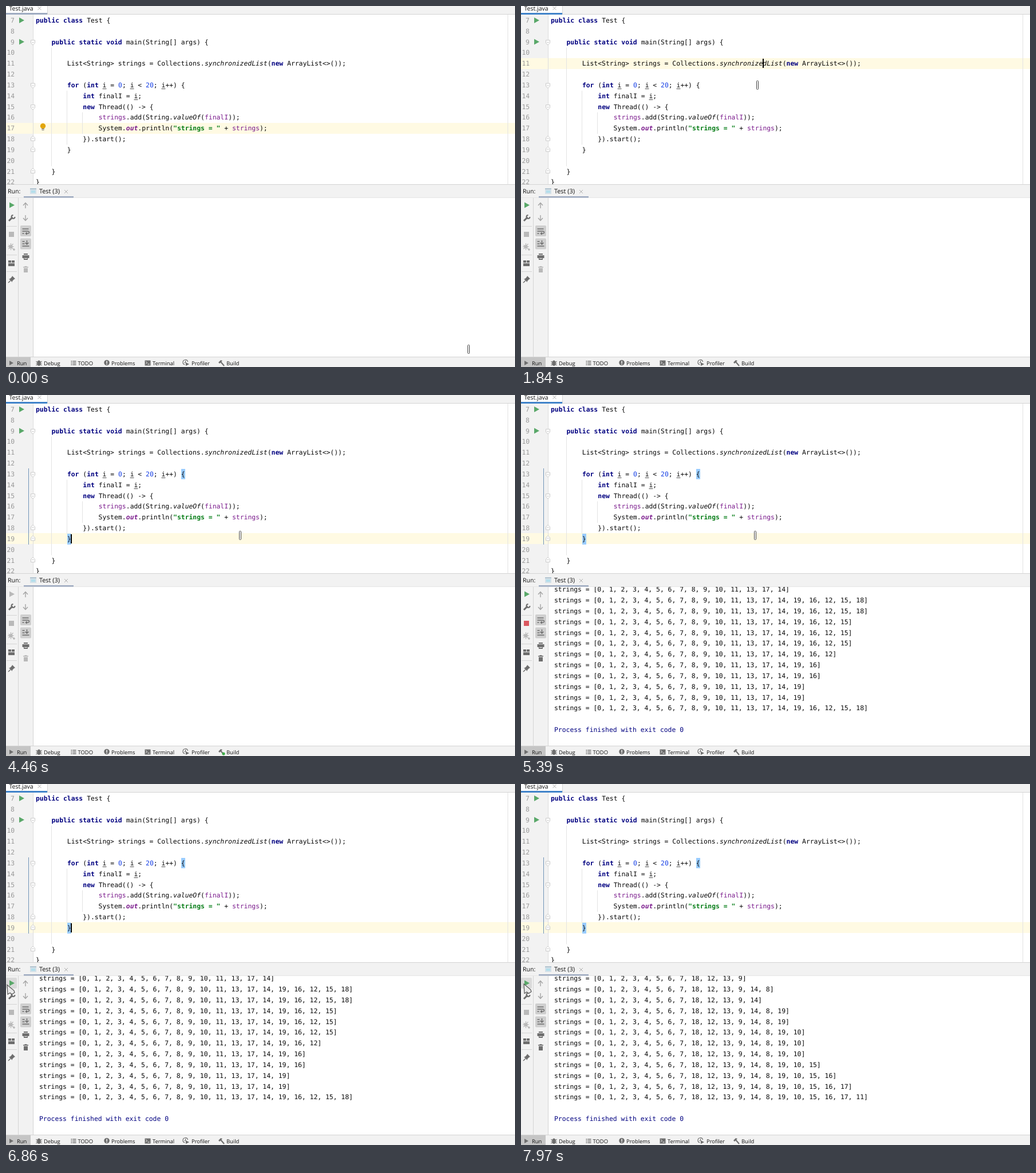
An HTML page with a canvas that plays this animation: 889x630 px, repeating every 8 s.

```html
<!DOCTYPE html>
<html lang="en">
<head>
<meta charset="utf-8">
<title>Editor run</title>
<style>
html, body { margin: 0; width: 100%; height: 100%; overflow: hidden; background: #fff; }
canvas { display: block; width: 889px; height: 630px; }
</style>
</head>
<body>
<canvas id="stage" width="889" height="630"></canvas>
<script>
const ctx = document.getElementById('stage').getContext('2d');
ctx.textRendering = 'geometricPrecision';
const LOOP = 8000, W = 889, H = 630;
const CW = 6.86, ROW = 18.83, LEFT = 52, OUT = 58;
const MONO = '11.395px "DejaVu Sans Mono", monospace';
const UI = 'px "Open Sans", "Noto Sans", sans-serif';
const BAR = '#f2f2f2', LINE = '#d4d4d4', DARK = '#6e6e6e', PALE = '#b9b9b9';
const GREEN = '#59a869', BLUE = '#4083c9', IDLE = '#9eabc1', NAVY = '#000080';

// Each piece after "|" starts with its style letter.
const STYLES = {
  '-': ['', '#080808'], k: ['bold ', NAVY], i: ['italic ', '#080808'],
  f: ['', '#7a1a8c'], o: ['italic bold ', '#7a1a8c'], s: ['bold ', '#067d17'],
  n: ['', '#1740e6'], u: ['', '#080808']
};
const CODE = [
  '|kpublic class|- Test {',
  '',
  '|-    |kpublic static void|- main(String[] args) {',
  '',
  '|-        List<String> strings = Collections.|isynchronizedList|-(|knew|- ArrayList<>());',
  '',
  '|-        |kfor|- (|kint|- |ui|- = |n0|-; |ui|- < |n20|-; |ui|-++) {',
  '|-            |kint|- finalI = |ui|-;',
  '|-            |knew|- Thread(() -> {',
  '|-                |fstrings|-.add(String.|ivalueOf|-(|ffinalI|-));',
  '|-                System.|oout|-.println(|s"strings = "|- + |fstrings|-);',
  '|-            }).start();',
  '|-        }',
  '',
  '|-    }',
  '|-}'
].map(s => s.split('|').slice(1));

const digits = n => Array.from({ length: n }, (_, i) => i);
const RUNS = [
  { order: [...digits(12), 13, 17, 14, 19, 16, 12, 15, 18],
    sizes: [15, 20, 20, 19, 19, 19, 18, 17, 17, 16, 16, 20] },
  { order: [...digits(8), 18, 12, 13, 9, 14, 8, 19, 10, 15, 16, 17, 11],
    sizes: [12, 14, 13, 15, 15, 16, 16, 16, 17, 18, 19, 20] }
];
const COMMAND = '"C:\\Program Files\\Tools\\jre-8.0.2021\\bin\\run.exe" ...';

// time, x, y
const PATH = [
  [0, 808, 599], [70, 808, 599], [300, 690, 470], [560, 430, 230], [820, 290, 95],
  [1240, 271, 98], [1450, 380, 97], [1640, 420, 95], [1710, 420, 95], [2000, 405, 190],
  [2180, 409, 245], [5390, 409, 245], [5660, 328, 298], [5740, 328, 298], [5950, 140, 380],
  [6160, 60, 415], [6400, 10, 429], [6720, 4, 353], [6860, 2, 350.5], [7680, 2, 350.5],
  [7830, 5, 349], [8000, 5, 349]
];
const CARET_OFF = [[2920, 3450], [3930, 4460], [4990, 5520], [6050, 6580], [7610, 8000]];

const within = (t, a, b) => t >= a && t < b;
const rowY = n => 25 + (n - 7) * ROW;

function pointer(t) {
  const i = Math.max(1, PATH.findIndex(p => p[0] > t));
  const [a, b] = [PATH[i - 1], PATH[i]];
  const k = (t - a[0]) / (b[0] - a[0]);
  return [a[1] + (b[1] - a[1]) * k, a[2] + (b[2] - a[2]) * k];
}

function box(x, y, w, h, color) {
  ctx.fillStyle = color;
  ctx.fillRect(x, y, w, h);
}

function pill(x, y, w, h, color) {
  ctx.fillStyle = color;
  ctx.beginPath();
  ctx.roundRect(x, y, w, h, 2);
  ctx.fill();
}

function text(s, x, y, color, font) {
  ctx.font = font;
  ctx.fillStyle = color;
  ctx.fillText(s, x, y);
}

// SVG path around a centre point, stroked when a width is given.
function icon(d, x, y, color, width) {
  const p = new Path2D(d);
  ctx.save();
  ctx.translate(x, y);
  ctx.fillStyle = ctx.strokeStyle = color;
  if (width) {
    ctx.lineWidth = width;
    ctx.stroke(p);
  } else {
    ctx.fill(p);
  }
  ctx.restore();
}

function dot(x, y, r, color) {
  ctx.fillStyle = color;
  ctx.beginPath();
  ctx.arc(x, y, r, 0, 7);
  ctx.fill();
}

const play = (x, y, color) => icon('M-4-5L5 0L-4 5Z', x, y, color);
const cross = (x, y) => icon('M-3-3L3 3M3-3L-3 3', x, y, '#b0b0b0', 1);

function codeLine(parts, y) {
  let col = 0;
  for (const part of parts) {
    const [style, color] = STYLES[part[0]];
    const s = part.slice(1), x = LEFT + col * CW;
    text(s, x, y, color, style + MONO);
    if (part[0] === 'u') box(x, y + 2, CW, 1, '#444');
    col += s.length;
  }
}

function editor(t) {
  const row = t < 1570 ? 17 : t < 2250 ? 11 : 19;
  const focused = t >= 1570;
  const blinkOff = CARET_OFF.some(([a, b]) => within(t, a, b));

  ctx.save();
  ctx.beginPath();
  ctx.rect(0, 0, W, 311);
  ctx.clip();
  box(0, 14, 47, 297, BAR);
  box(0, Math.round(rowY(row) - 9.5), W, 19, '#fffae3');
  box(47, 15, 1, 296, '#dcdcdc');
  box(876, 15, 1, 296, '#e2e2e2');
  for (const [x, a, b] of [[79, 10, 20], [106, 14, 18], [133, 16, 17]])
    box(x, rowY(a) - 9, 1, (b - a + 1) * ROW, '#e3e3e3');

  if (row === 19) {
    box(39, 128, 1, 133, '#6f93b8');
    box(306, 129, 7, 18, '#99ccff');
    box(107, 242, 7, 19, '#99ccff');
  }

  CODE.forEach((parts, i) => {
    const n = i + 7, y = Math.round(rowY(n) + 4);
    text(String(n), n < 10 ? 8 : 1.5, y, '#999', MONO);
    codeLine(parts, y);
  });
  play(27, 25, GREEN);
  play(27, 62.5, GREEN);

  for (const n of [9, 13, 15, 18, 19, 21]) {
    const d = n < 16 ? 'M-3.5-4H3.5V1L0 4.5L-3.5 1Z' : 'M-3.5 4H3.5V-1L0-4.5L-3.5-1Z';
    icon(d, 47, rowY(n) + (n < 16 ? 1 : -1), '#fff');
    icon(d + 'M-2 0H2', 47, rowY(n) + (n < 16 ? 1 : -1), '#c9c9c9', 1);
  }
  if (row === 17) {
    dot(64.5, 209.5, 4.7, '#e2a60c');
    box(62, 214, 5, 1, '#777');
    box(62.5, 216, 4, 1, '#777');
  }
  if (focused && !blinkOff) box(row === 11 ? 422 : 113, Math.round(rowY(row) - 8), 2, 16, '#000');
  ctx.restore();

  box(0, 0, W, 14, BAR);
  box(0, 0, 72, 14, '#fff');
  box(0, 14, W, 1, LINE);
  box(72, 0, 1, 14, LINE);
  box(0, 12, 72, 3, focused ? BLUE : IDLE);
  text('Test.java', 5.5, 8, '#111', 10.5 + UI);
  cross(58.5, 4);
}

function runHeader(t) {
  const active = within(t, 220, 1570);
  box(0, 311, W, 24, active ? '#e1e6eb' : BAR);
  box(0, 311, W, 1, LINE);
  if (active) for (const x of [255, 512, 769]) box(x, 312, 1, 22, '#eef1f4');
  box(0, 334, W, 1, active ? '#dce1e6' : '#e6e6e6');
  text('Run:', 3, 327, '#111', 10.5 + UI);
  box(42, 318, 11, 10, '#d3e0e8');
  box(42, 318, 11, 2, '#b3c4cf');
  box(44, 322, 7, 4, '#b4dfec');
  text('Test (3)', 58, 327, '#111', 10.9 + UI);
  cross(105, 324);
  box(31, 332, 87, 2.5, active ? BLUE : IDLE);
}

function toolbars(t, filled, running) {
  box(0, 335, 47, 277, BAR);
  box(21, 335, 1, 277, LINE);
  box(47, 335, 1, 277, LINE);
  for (const y of [384, 434, 463]) box(1, y, 18, 1, LINE);

  const busy = within(t, 3450, 5190) || within(t, 6930, 7340);
  if (t >= 6690) pill(0, 338, 19, 19, '#dadada');
  play(10, 347.5, busy ? PALE : GREEN);
  icon('M-5 5L1.5-1.5', 10, 370, DARK, 3);
  icon('M2-5A3 3 0 1 0 5-2', 10.5, 370, DARK, 2);
  box(5, 394, 9, 9, running ? '#db5860' : PALE);
  icon('M-5-3L4 5M-5 4L3-5M-6 0H4M-1-6V6', 9.5, 420, PALE, 1.3);
  dot(8.5, 420, 3, PALE);
  icon('M2 5H6M4 3V7', 10, 420, PALE, 1.5);
  box(4, 444, 5, 4, DARK);
  box(10, 444, 5, 4, DARK);
  box(4, 449, 11, 5, DARK);
  icon('M1-6L6-1L4 0L1 3L1 5L-5-1L-3-1L0-4Z', 10, 477, DARK);
  icon('M-2 2L-6 6', 10, 477, DARK, 1.4);

  icon('M0 5V-4M-4 0L0-4.5L4 0', 34, 348, '#a5a5a5', 1.4);
  icon('M0-5V4M-4 0L0 4.5L4 0', 34, 370, '#a5a5a5', 1.4);
  pill(25, 383, 19, 19, '#cfcfcf');
  pill(25, 405.5, 19, 19, '#cfcfcf');
  icon('M-6-4H5M-6 0H3Q6 0 6 2Q6 4 3 4H0M-6 4H-3M2 2L0 4L2 6', 34.5, 393, DARK, 1.4);
  icon('M-6 5H6M-6 1H-2M-6-3H-2M2-5V1M-1-1L2 2L5-1', 34.5, 414, DARK, 1.4);
  box(31, 432, 7, 2, DARK);
  box(28.5, 435, 12, 5, DARK);
  box(31, 439, 7, 4, DARK);
  box(32, 440, 5, 1, BAR);
  const bin = filled ? DARK : PALE;
  box(30, 455, 9, 1.5, bin);
  box(32.5, 454, 4, 1, bin);
  box(31, 457.5, 7, 7.5, bin);
}

function consoleRows(t, run) {
  box(48, 335, W - 48, 277, '#fff');
  if (within(t, 5190, 5390) || within(t, 7340, 7540)) text(COMMAND, OUT, 349, NAVY, MONO);
  if (!run) return;
  ctx.save();
  ctx.beginPath();
  ctx.rect(48, 335, W - 48, 277);
  ctx.clip();
  const y = i => Math.round(343.3 + i * ROW);
  run.sizes.forEach((n, i) =>
    text(`strings = [${run.order.slice(0, n).join(', ')}]`, OUT, y(i), '#080808', MONO));
  text('Process finished with exit code 0', OUT, y(13), NAVY, MONO);
  ctx.restore();
}

function bottomBar(t) {
  box(0, 612, W, 18, BAR);
  box(0, 612, W, 1, LINE);
  box(0, 613, 43, 17, '#c5c5c5');
  const labels = [['Run', 19], ['Debug', 66], ['TODO', 125.5], ['Problems', 184],
    ['Terminal', 256], ['Profiler', 324], ['Build', 385]];
  for (const [s, x] of labels) text(s, x, 627, '#111', 9.4 + UI);

  icon('M-3-4L4 0L-3 4Z', 9, 623, DARK);
  icon('M-5-3L5 4M-5 4L5-3M-5 .5H5', 57.5, 623, DARK, 1.2);
  icon('M-3 0A3 4.5 0 0 1 3 0V2A3 3 0 0 1-3 2Z', 57.5, 623, DARK);
  icon('M-4-3H-2M-4 0H-2M-4 3H-2M-1-3H5M-1 0H5M-1 3H5', 117.5, 623, DARK, 1.4);
  dot(176, 622.5, 4.8, DARK);
  box(175.3, 619.5, 1.5, 4, '#fff');
  box(175.3, 624.5, 1.5, 1.5, '#fff');
  box(242.5, 618.5, 10, 9, DARK);
  icon('M-3-2L-1 0L-3 2M0 2.5H3', 247.5, 622.5, '#fff', 1);
  icon('M4-1A4.3 4.3 0 1 0-1 4M0-3V0L-2 1', 313.5, 622, DARK, 1.2);
  icon('M0 0L6 3L0 6Z', 314, 622, DARK);
  icon('M-5-1L-1-5L2-4L-3 1Z', 376, 623, DARK);
  icon('M-1-2L5 5', 376, 623, DARK, 2);
  if (within(t, 3450, 5090) || within(t, 6930, 7200)) dot(380, 626, 2.6, '#3fae4a');
}

function cursor(t) {
  const [x, y] = pointer(t);
  if (x < 47 || within(y, 312, 335)) {
    const d = 'M0 0L1 16.5L5 14L8.5 16.5L13 13.5L12 10Z';
    icon(d, x, y, '#e8e8e8');
    icon(d, x, y, '#555', 1.2);
    return;
  }
  ctx.beginPath();
  ctx.roundRect(Math.round(x) - 1.5, Math.round(y) - 7.5, 3, 15, 1);
  ctx.fillStyle = '#f4f4f4';
  ctx.fill();
  ctx.strokeStyle = '#4a4a4a';
  ctx.lineWidth = 1;
  ctx.stroke();
}

function draw(t) {
  const run = within(t, 5390, 6930) ? RUNS[0] : t >= 7540 ? RUNS[1] : null;
  const running = within(t, 5190, 5450) || within(t, 7340, 7610);
  box(0, 0, W, H, '#fff');
  editor(t);
  runHeader(t);
  consoleRows(t, run);
  toolbars(t, run || running, running);
  bottomBar(t);
  cursor(t);
}

const start = performance.now();
function frame() {
  draw((performance.now() - start) % LOOP);
  requestAnimationFrame(frame);
}
frame();
</script>
</body>
</html>
```
